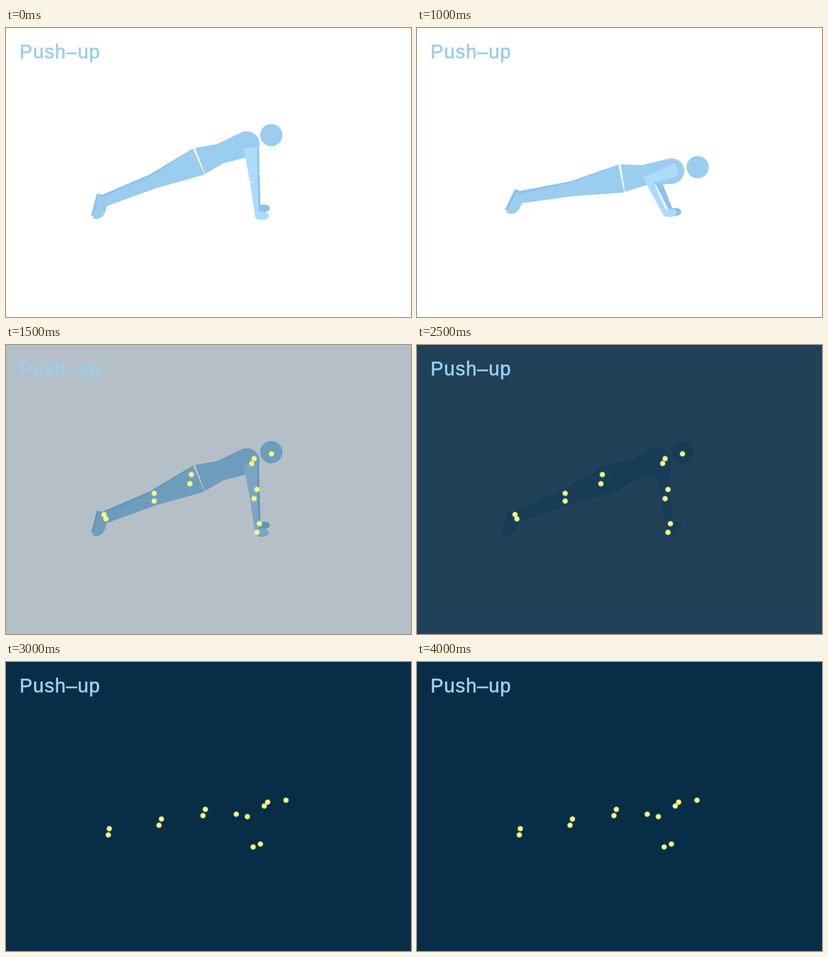
Write an HTML page that moves like this. It is 839 by 600 pixels and loops after 4.5 s.

```html
<!DOCTYPE html>
<html lang="en">
<head>
<meta charset="utf-8">
<title>Push-up</title>
<style>
html, body { margin: 0; width: 100%; height: 100%; overflow: hidden; background: #fff; }
svg { display: block; width: 839px; height: 600px; }
.main { fill: #9bcdef; }
.dark { fill: #8dc3e9; }
.light { fill: #acdbfd; }
text {
  font: 40px "Liberation Sans", Arial, sans-serif;
  letter-spacing: 1.4px;
  fill: #9bcdef; stroke: #9bcdef; stroke-width: .9px;
}
</style>
</head>
<body>
<svg id="stage" viewBox="0 0 839 600">
  <defs>
    <radialGradient id="glow">
      <stop offset=".65" stop-color="#f6ff82" stop-opacity=".45"/>
      <stop offset="1" stop-color="#f6ff82" stop-opacity="0"/>
    </radialGradient>
  </defs>
  <g id="bodies"></g>
  <rect id="night" width="839" height="600" fill="#082d46" opacity="0"/>
  <g id="joints"></g>
  <text x="28" y="62.5">Push–up</text>
</svg>
<script>
const LOOP = 4500;

// Each body is painted back to front: [shade, path]
const poses = {
  up: {
    head: [549.6, 222.3],
    parts: [
      ["dark", "M387 250.5L297 304.5L199 346.3L189.5 343.8Q188.2 343.8 187.8 345L176.4 389.3L190 392L210 365L300 322L392 262Z"],
      ["main", "M388 251.5L411.3 304.6L310 333L209 369.7L205.5 381.5Q200 396.5 186 396.5L180 395.2L191.5 348.3L200 350.8L299 308Z"],
      ["dark", "M503 233L524 230.5L525 301.6L510 302Z"],
      ["dark", "M511 303.2L525.4 302.6L527.2 367.5Q530 366.5 535 366.5C542 366.5 546.6 370 546.6 374.6C546.6 379 541 382.3 534 382.3L523 381.6Z"],
      ["main", "M392 249L437 241L487 217A26.6 26.6 0 1 1 505 266.7L450 281L412 303Z"],
      ["light", "M492.3 249.2L520 247.2L521.3 318.3L505.3 319Z"],
      ["light", "M505.6 320.2L521.5 319.5L523.5 382.3Q526 381.5 530 381.5C539 381.5 544.6 385 544.6 389.6C544.6 395 538 398.6 530 398.6C521 398.6 516 395.5 515.6 389Z"]
    ],
    joints: [550,226, 514,236, 509,246, 520,300, 514,319, 525,371, 520,389,
             384,269, 381,288, 307,308, 307,324, 203,352, 207,361]
  },
  down: {
    head: [581.5, 288.8],
    parts: [
      ["dark", "M417 283.7L317 318.5L212.5 338.5L205.5 334.8Q203.2 334 202 336.3L182 377.3L192 381L216 359L320 335L420 300Z"],
      ["main", "M417.3 285.5L429.5 341.5L325 349L217.5 363.7L213 373.5Q207 386 194 386L184.7 383.3L205.8 340L214 344.2L320 320.5Z"],
      ["dark", "M492 320L507.5 320L528.8 374Q531 373.6 535 373.6C543 373.6 547.6 377 547.6 381.8C547.6 387 542 390.2 535 390.2C528 390.2 523.5 387 522 378.5Z"],
      ["main", "M422 283L467 284.5L521 271.3A26.5 26.5 0 1 1 530 323.4L475 326.3L430.6 340Z"],
      ["light", "M469 310L534.5 280.4L542.5 306.8L476 325.3Z"],
      ["light", "M475 324L490.5 321L515.3 376.5Q518.5 375.6 523 375.6C531.5 375.6 537.4 379 537.4 384C537.4 389.3 531 392.7 523 392.7C514 392.7 508.8 389.8 508.5 384.5Z"]
    ],
    joints: [580,287, 542,291, 535,299, 477,316, 500,321, 527,378, 512,384,
             413,306, 408,319, 322,326, 317,339, 214,346, 212,359]
  }
};

// [start ms, pose, darkness, joints shown]
const steps = [
  [0, "up", 0, false],
  [1000, "down", 0, false],
  [1500, "up", .3, true],
  [2000, "down", .6, true],
  [2500, "up", .9, true],
  [3000, "down", 1, true],
  [3500, "up", 1, true],
  [4000, "down", 1, true]
];

const byId = id => document.getElementById(id);

function add(parent, tag, attrs = {}) {
  const el = document.createElementNS("http://www.w3.org/2000/svg", tag);
  for (const key in attrs) el.setAttribute(key, attrs[key]);
  return parent.appendChild(el);
}

for (const pose of Object.values(poses)) {
  pose.body = add(byId("bodies"), "g");
  for (const [shade, d] of pose.parts) add(pose.body, "path", { class: shade, d });
  const [cx, cy] = pose.head;
  add(pose.body, "circle", { class: "main", cx, cy, r: 23.1 });

  pose.dots = add(byId("joints"), "g");
  for (let i = 0; i < pose.joints.length; i += 2) {
    const at = { cx: pose.joints[i], cy: pose.joints[i + 1] };
    add(pose.dots, "circle", { ...at, r: 7.2, fill: "url(#glow)" });
    add(pose.dots, "circle", { ...at, r: 5, fill: "#f6ff82" });
  }
}

const show = (el, on) => el.setAttribute("display", on ? "inline" : "none");

function draw(now) {
  const t = now % LOOP;
  const [, name, darkness, lit] = steps.findLast(step => step[0] <= t);
  for (const key in poses) {
    show(poses[key].body, key === name);
    show(poses[key].dots, lit && key === name);
  }
  byId("night").setAttribute("opacity", darkness);
}

const start = performance.now();
function tick() {
  draw(performance.now() - start);
  requestAnimationFrame(tick);
}
tick();
</script>
</body>
</html>
```
